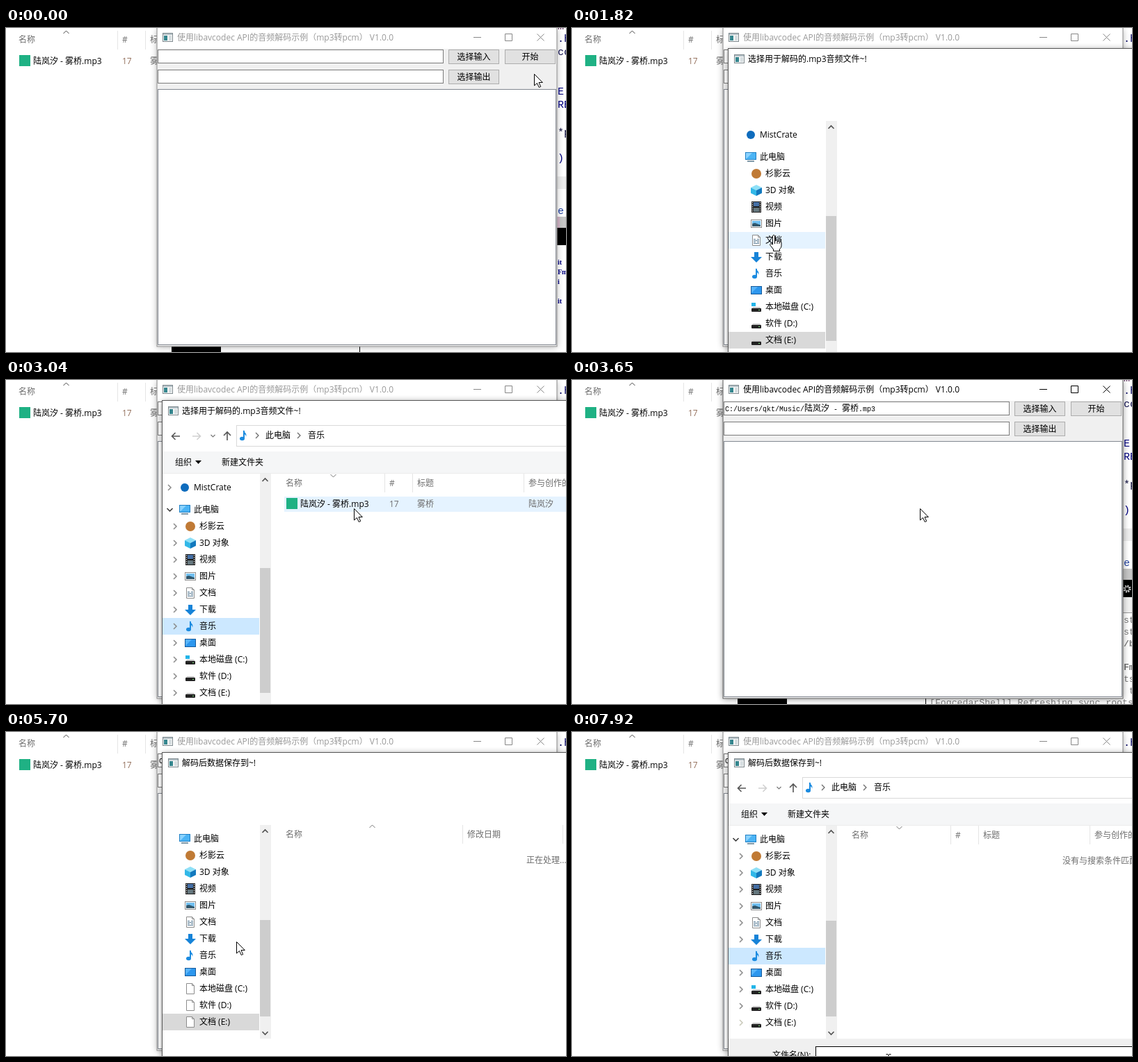
An HTML page for the animation above (8000 ms loop, 805 by 467 pixels).

```html
<!DOCTYPE html>
<html lang="zh">
<head>
<meta charset="utf-8">
<style>
html, body { margin: 0; width: 100%; height: 100%; overflow: hidden; background: #fff; }
svg { display: block; width: 805px; height: 467px; font: 12px 'Open Sans', 'Noto Sans CJK SC', 'Noto Sans CJK', sans-serif; }
text { white-space: pre; }
</style>
</head>
<body>
<svg id="stage" viewBox="0 0 805 467">
  <defs><filter id="blur" x="-10%" y="-10%" width="120%" height="120%"><feGaussianBlur stdDeviation="5"/></filter></defs>
  <g id="scene"></g>
</svg>
<script>
const LOOP = 8000, STEP = 203.4;
const SINGER = '陆岚汐', SONG = '雾桥', FILE = `${SINGER} - ${SONG}.mp3`;
const GREY = '#6d6d6d';
const MONO = "font-family=\"'Liberation Mono','Noto Sans CJK SC',monospace\"";

const rect = (x, y, w, h, fill, extra = '') => `<rect x="${x}" y="${y}" width="${w}" height="${h}" fill="${fill}" ${extra}/>`;
const box = (x, y, w, h, fill, stroke) => rect(x + .5, y + .5, w - 1, h - 1, fill, `stroke="${stroke}"`);
const text = (x, y, s, fill = '#000', extra = '') => `<text x="${x}" y="${y}" fill="${fill}" ${extra}>${s}</text>`;
const line = (d, stroke, w = 1, fill = 'none') => `<path d="${d}" fill="${fill}" stroke="${stroke}" stroke-width="${w}"/>`;
const shape = (d, fill) => `<path d="${d}" fill="${fill}"/>`;
const disc = (x, y, r, fill) => `<circle cx="${x}" cy="${y}" r="${r}" fill="${fill}"/>`;
const at = (x, y, s) => `<g transform="translate(${x} ${y})">${s}</g>`;
const shadow = (x, y, w, h, o) => rect(x, y, w, h, '#000', `opacity="${o}" filter="url(#blur)"`);
const vline = (x, y, h) => rect(x, y, 1, h, '#e5e5e5');

// Chevrons centred on a point
const right = (x, y, c = '#8a8a8a', w = 1.5) => line(`M${x - 2} ${y - 4}l4 4l-4 4`, c, w);
const down = (x, y, c, w = 1.2, r = 4) => line(`M${x - r} ${y - r / 2}l${r} ${r}l${r} ${-r}`, c, w);
const up = (x, y, c, w = 1.2, r = 4) => line(`M${x - r} ${y + r / 2}l${r} ${-r}l${r} ${r}`, c, w);

// 16 by 16 icons
const drive = shape('M3 8h10l2 3H1z', '#c9c9c9') + rect(1, 10, 14, 5, '#222', 'rx="1"') + rect(11, 12, 2, 1, '#7fe07f');
const paper = line('M2.5 .5h8l3 3v12h-11z', '#8c8c8c', 1, '#fff') + line('M10.5 .5v3h3', '#8c8c8c');
const icon = {
  cloud: disc(8, 8, 6, '#0f6cbd'),
  nut: disc(8, 8, 7, '#c07a35'),
  file: rect(0, 0, 16, 16, '#1fb184'),
  pc: box(0, 1, 16, 11, '#4bb4f5', '#1f7fc4') + shape('M1 11V2h9z', '#8bd3ff') + rect(3, 13, 10, 2, '#7f98a8'),
  cube: shape('M8 0l8 4l-8 4l-8-4z', '#8fe0f7') + shape('M0 4l8 4v8l-8-4z', '#32b8e8') + shape('M16 4l-8 4v8l8-4z', '#1279be'),
  film: rect(1, 0, 14, 16, '#1c1c1c') + rect(4, 1, 8, 6, '#456fa5') + rect(4, 9, 8, 6, '#66787f') +
    line('M2.5 1v15M13.5 1v15', '#eee', 1.2).replace('/>', ' stroke-dasharray="1.5 1.5"/>'),
  photo: box(0, 2, 16, 12, '#fff', '#8d8d8d') + rect(2, 4, 12, 8, '#70bff0') + shape('M2 12V8l4-1l8 3v2z', '#31576c'),
  doc: paper + line('M4 6.5h3M9 6.5h3M4 8.5h8M4 10.5h3M9 10.5h3M4 12.5h8', '#5d7f98'),
  load: shape('M5 1h6v7h5l-8 8l-8-8h5z', '#1683d8'),
  note: line('M8 1v11', '#1b8be0', 2) + `<ellipse cx="5.5" cy="12.5" rx="3.5" ry="2.7" fill="#1b8be0"/>` + shape('M7 0c1 4 6 4 4 10c0-4-3-4-4-5z', '#1b8be0'),
  desk: box(0, 2, 16, 12, '#2d97ee', '#14599b') + shape('M1 12V3h9z', '#58b4fa'),
  paper, drive,
  sys: drive + rect(1, 2, 6, 5, '#23b5e8'),
  app: box(0, 0, 15, 13, '#f5f5f5', '#7f8a8f') + rect(1, 1, 13, 2, '#b3c0c6') + rect(2, 4, 5, 7, '#35868e') + rect(9, 4, 4, 7, '#d5dde0')
};

const KIDS = [['nut', '杉影云'], ['cube', '3D 对象'], ['film', '视频'], ['photo', '图片'], ['doc', '文档'], ['load', '下载'],
  ['note', '音乐'], ['desk', '桌面'], ['sys', '本地磁盘 (C:)'], ['drive', '软件 (D:)'], ['drive', '文档 (E:)']];
const MUSIC = 6, DISK = 10;

// Pointer stops: step, x, y
const STOPS = [[0, 759, 66], [3, 664, 42], [6, 664, 42], [9, 290, 298], [11, 297, 350], [13, 297, 350], [15, 500, 185],
  [18, 500, 185], [22, 661, 57], [23, 661, 57], [24, 668, 70], [26, 668, 70], [28, 331, 302], [32, 306, 324], [35, 306, 324], [39, 455, 472]];

function pointer(k) {
  const i = Math.max(1, STOPS.findIndex(s => s[0] >= k));
  const [a, x, y] = STOPS[i - 1], [b, u, v] = STOPS[i];
  const p = (k - a) / (b - a), e = p * p * (3 - 2 * p);
  return { x: Math.round(x + (u - x) * e), y: Math.round(y + (v - y) * e) };
}

function drawPointer(k, { x, y }) {
  if (k > 7 && k < 11) return at(x, y, line('M-1.5 13V1.5Q0-1 1.5 1.5V9Q4 7 5 9.5Q7 8 8 10.5Q11 9 11 12V16Q11 19 8.5 20.5V23.5H-.5V21L-5.5 14.5Q-5 11.5-1.5 14ZM1.5 9V13M5 10V13M8 11V13', '#000', 1, '#fff'));
  if (k > 35 && y > 453) return at(x, y, line('M-3.5-7.5h2.5l1 1l1-1h2.5M0-7v14M-3.5 7.5h7', '#000'));
  return at(x + .5, y + .5, line('M0 0V16.5L4 13L6.7 19L9.2 18L6.5 12H11.8Z', '#000', 1, '#fff'));
}

function explorer() {
  return text(18, 21, '名称', GREY) + up(86.5, 6, '#444', 1) + text(167, 21, '#', GREY) + text(207, 21, '标', GREY) +
    vline(160, 4, 27) + vline(200, 4, 27) + at(19, 39, icon.file) + text(39, 52, FILE) +
    text(167, 52, '17', '#94705c') + text(207, 52, SONG, GREY);
}

function backdrop(logs, covered) {
  const code = (y, s, c = '#000080', f = 15) => text(793, y, s, c, `${MONO} font-size="${f}"`);
  const bold = (y, s) => text(793, y, s, '#000080', 'font-family="Liberation Serif,serif" font-weight="700" font-size="10"');
  const log = (y, s, extra = '') => text(793, y, s, '#777', `${MONO} font-size="13" ${extra}`);
  let s = rect(238, 457, 71, 10, '#000') + rect(508, 457, 1, 10, '#000') + code(20, '.h', '#000060');
  if (covered) return s;
  s += code(2, 'm', '#603060') + code(39, 'cc', '#101050') + code(96, 'E') + code(115, 'RE') + code(155, '*p', '#101040') + code(192, ')', '#000080') +
    rect(792, 214, 13, 18, '#ededed') + code(268, 'e', '#2040a0') + rect(792, 272, 13, 16, '#c6c6c6') + rect(792, 288, 13, 25, '#000');
  if (!logs) return s + rect(792, 272, 4, 16, '#d5b5c8') + bold(341, 'it') + bold(355, 'Fm') + bold(369, 'i') + bold(397, 'it');
  return s + rect(792, 313, 13, 23, '#f0f0f0') + rect(792, 335, 13, 1, '#999') +
    `<circle cx="798" cy="301" r="4.5" fill="none" stroke="#ddd" stroke-width="2" stroke-dasharray="2 1.5"/>` + `<circle cx="798" cy="301" r="3" fill="none" stroke="#ddd"/>` +
    log(350, 'st') + log(367, 'st') + log(384, '/b', 'font-weight="700"') + log(418, 'Fm', 'font-weight="700"') + log(435, 'ts') + log(452, ' t') +
    text(514, 469, '[FogcedarShell] Refreshing sync roots', '#808080', `${MONO} font-size="13.2"`);
}

function button(x, y, label, p, live) {
  const hot = live && p.x >= x && p.x < x + 73 && p.y >= y && p.y < y + 21;
  return box(x, y, 73, 21, hot ? '#e5f1fb' : '#e1e1e1', hot ? '#0078d7' : '#adadad') +
    text(x + 36.5, y + 15, label, '#000', 'text-anchor="middle"');
}

function appWindow(active, filled, p, live) {
  const ink = active ? '#000' : '#999', edge = active ? '#606060' : '#8f8f8f';
  let s = shadow(217, 2, 575, 458, active ? .42 : .3) + rect(217, -1, 575, 460, '#f0f0f0', `stroke="${edge}" stroke-width="1"`) +
    rect(218, 0, 573, 30, '#fff') + at(225, 7, icon.app) +
    text(246, 18, '使用libavcodec API的音频解码示例（mp3转pcm） V1.0.0', ink) +
    line('M672 13.5h11M717.5 8.5h10v10h-10zM763.5 8.5l10 10M773.5 8.5l-10 10', active ? '#000' : '#888') +
    box(218, 31, 411, 20, '#fff', '#7a7a7a') + box(218, 60, 411, 20, '#fff', '#7a7a7a') +
    button(636, 31, '选择输入', p, live) + button(717, 31, '开始', p, live) + button(636, 60, '选择输出', p, live) +
    box(218, 88, 573, 369, '#fff', '#828790');
  if (filled) s += `<text x="220" y="45" ${MONO} font-size="10">C:/Users/qkt/Music/<tspan font-size="12">${SINGER}</tspan> - <tspan font-size="12">${SONG}</tspan>.mp3</text>`;
  return s;
}

function tree(d, p) {
  const dy = d.full ? 1 : 0, root = (d.save ? 154 : 186) + dy, sel = d.music ? MUSIC : DISK;
  let s = '';
  if (!d.save) s += at(249, 146 + dy, icon.cloud) + text(270, 158 + dy, 'MistCrate') + (d.full ? right(235, 155) : '');
  s += at(249, root - 8, icon.pc) + text(270, root + 4, '此电脑') + (d.full ? down(235.5, root, '#333', 1.5) : '');
  KIDS.forEach(([pic, name], i) => {
    const y = root + 24 * (i + 1);
    const hot = (d.full || !d.save) && p.x > 225 && p.x < 364 && p.y >= y - 12 && p.y < y + 12;
    if (i === sel) {
      s += rect(225, y - 12, 139, 24, d.music ? '#cce8ff' : '#d9d9d9');
      if (hot && d.music) s += box(225, y - 12, 139, 24, 'none', '#99d1ff');
    } else if (hot) s += rect(225, y - 12, 139, 24, '#e5f3ff');
    if (d.full && !(d.save && d.music && i === MUSIC)) s += right(243, y, d.save && i === DISK ? '#c8c8b8' : '#8a8a8a');
    s += at(257, y - 8, icon[d.save && !d.full && i > 7 ? 'paper' : pic]) + text(278, y + 4, name);
  });
  s += rect(365, 134 + dy, 16, d.save ? 308 - dy : 333, '#f0f0f0') + up(372.5, 143 + dy, '#505050', 1.6) +
    rect(365, 271 + dy * !!d.save, 15, d.save ? 139 - dy : 180, '#cdcdcd');
  return s + (d.save ? down(372.5, 434, '#505050', 1.6) : '');
}

function bars(d) {
  return line('M250 81h-11M243.5 76l-5 5l5 5', '#555', 1.6) + line('M268 81h11M274.5 76l5 5l-5 5', '#d0d0d0', 1.6) +
    down(297.5, 80.5, '#777', 1.2, 3) + line('M318 87v-12M313 80l5-5l5 5', '#555', 1.6) +
    box(331, 65, 500, 31, '#fff', '#d9d9d9') + at(334, 72, d.music ? icon.note : icon.drive) + right(361, 80, '#666', 1.2) +
    text(373, 84, '此电脑') + right(421, 80, '#666', 1.2) + text(434, 84, d.music ? '音乐' : '文档 (E:)') +
    rect(225, 103, 580, 32, '#f5f6f7') + rect(225, 134, 580, 1, '#ececec') +
    text(243, 123, '组织') + shape('M272 116h9l-4.5 5z', '#000') + text(310, 123, '新建文件夹');
}

function listing(d, p) {
  const dy = d.full ? 1 : 0, none = text(705, 190, '没有与搜索条件匹配的项。', GREY);
  if (!d.music) {
    if (!d.full && !d.save) return '';
    return text(402, 152 + dy, '名称', GREY) + up(526.5, 136 + dy, '#777', 1) + vline(656, 134 + dy, 27) + vline(800, 134 + dy, 27) +
      text(663, 152 + dy, '修改日期', GREY) + (d.full ? none : text(748, 189, '正在处理...', GREY));
  }
  let s = text(402, 153, '名称', GREY) + down(470.5, 138, '#777', 1) + text(551, 153, '#', GREY) + text(591, 153, '标题', GREY) +
    text(751, 153, '参与创作的艺术家', GREY) + [544, 584, 744].map(x => vline(x, 135, 27)).join('');
  if (d.save) return s + none;
  if (p.x > 400 && p.y >= 168 && p.y < 190) s += rect(400, 168, 405, 22, '#e5f3ff');
  return s + at(403, 170, icon.file) + text(423, 183, FILE) + text(551, 183, '17', GREY) + text(591, 183, SONG, GREY) + text(751, 183, SINGER, GREY);
}

function dialog(d, p) {
  let s = shadow(225, 31, 620, 480, .42) + box(224, 29, 600, 460, '#fff', '#555') + at(233, 38, icon.app) +
    text(253, 49, d.save ? '解码后数据保存到~!' : '选择用于解码的.mp3音频文件~!');
  if (!d.tree) return s;
  s += tree(d, p) + listing(d, p);
  if (d.full) s += bars(d);
  if (d.full && d.save) s += rect(225, 442, 580, 25, '#f0f0f0') + text(288, 470, '文件名(N):') +
    box(350, 453, 500, 30, '#fff', p.x > 350 && p.y > 453 ? '#000' : '#0067b8');
  return s;
}

function scene(k) {
  const p = pointer(k), save = k >= 26, open = save || (k >= 5 && k < 18);
  const t = k - (save ? 26 : 5);
  const d = { save, tree: t >= (save ? 1 : 2), full: t >= (save ? 4 : 5), music: t >= (save ? 7 : 8) };
  return rect(0, 0, 805, 467, '#fff') + backdrop(k >= 18, open) + explorer() +
    appWindow(!open && k >= 4, k >= 18, p, !open) + (open ? dialog(d, p) : '') + drawPointer(k, p);
}

const root = document.getElementById('scene');
const start = performance.now();
let shown = -1;

function tick() {
  const t = (performance.now() - start) % LOOP, k = Math.floor((t + 20) / STEP);
  if (k !== shown) root.innerHTML = scene(shown = k);
  requestAnimationFrame(tick);
}
tick();
</script>
</body>
</html>
```
